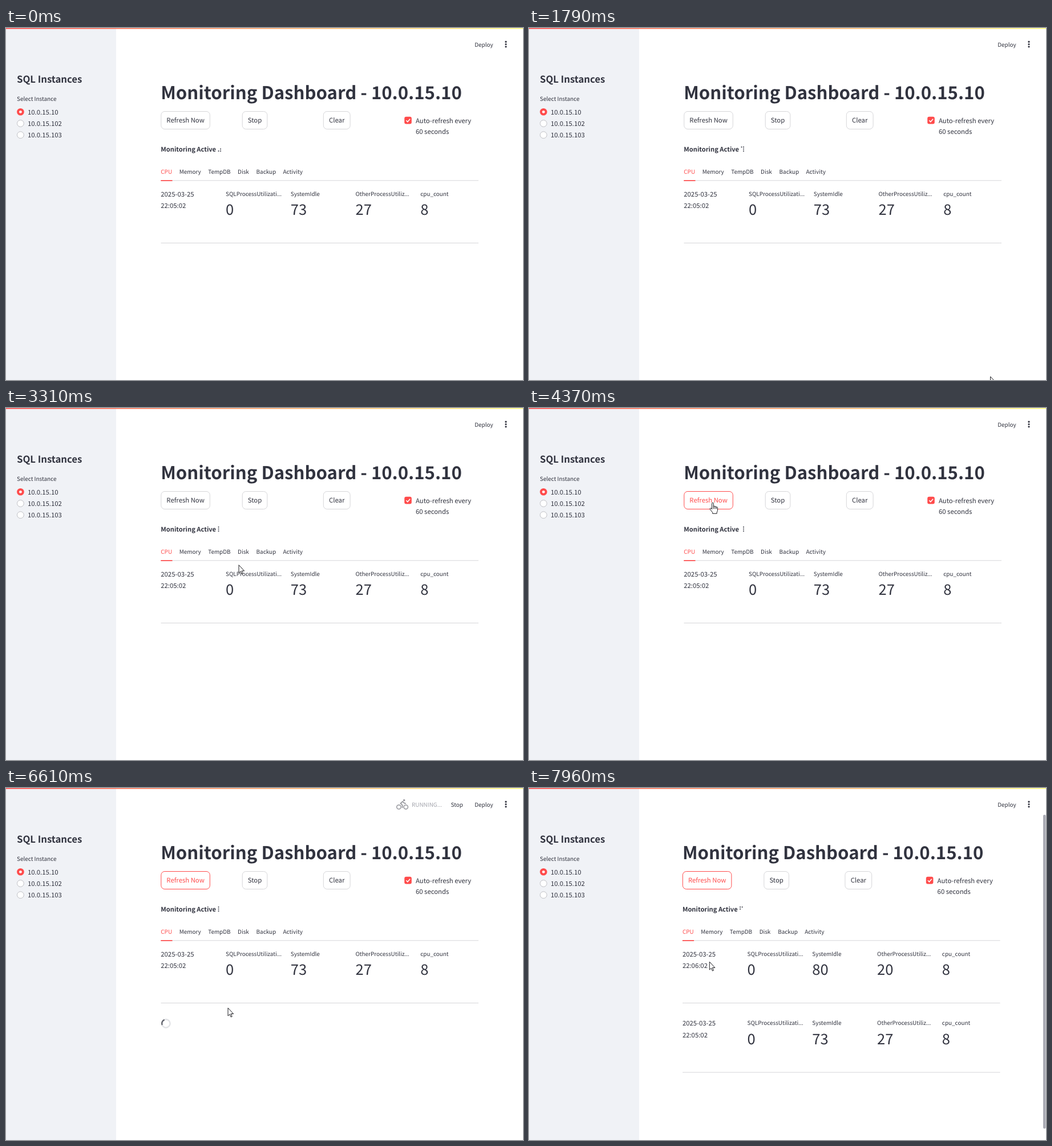
An HTML page that plays this animation: 906x618 px, repeating every 8 s.

```html
<!DOCTYPE html>
<html lang="en">
<head>
<meta charset="utf-8">
<title>Monitoring Dashboard</title>
<style>
  html, body { margin: 0; width: 100%; height: 100%; overflow: hidden; background: #fff; }
  svg { display: block; width: 906px; height: 618px; }
  text {
    font-family: "Noto Sans CJK SC", "Noto Sans CJK JP", "Noto Sans CJK", "Noto Sans", sans-serif;
    font-size: 11.33px; fill: #31333f; text-rendering: geometricPrecision; white-space: pre;
  }
  .small { font-size: 9.92px; }
  .value { font-size: 25.5px; }
  .title { font-size: 31.15px; font-weight: 700; }
  .head { font-size: 16.7px; font-weight: 600; }
  .strong { font-size: 11.15px; font-weight: 600; }
  .mid { text-anchor: middle; }
  .red { fill: #ff4b4b; }
  .mute { fill: #a3a4ac; }
  .line { stroke: #d6d6d9; fill: none; }
  .button { fill: #fff; stroke: #d6d6d9; }
  .hot rect { stroke: #ff4b4b; }
  .hot text { fill: #ff4b4b; }
  .pointer { fill: #fff; stroke: #1c1c20; stroke-linejoin: round; stroke-linecap: round; }
</style>
</head>
<body>
<svg viewBox="0 0 906 618">
  <defs>
    <linearGradient id="bar">
      <stop stop-color="#ff4b4b"/>
      <stop offset="1" stop-color="#fffd80"/>
    </linearGradient>
  </defs>
  <rect width="906" height="618" fill="#fff"/>
  <rect width="193" height="618" fill="#f0f2f6"/>
  <rect width="906" height="1.6" fill="url(#bar)"/>
  <g id="side"></g>
  <g id="top"></g>
  <g id="running">
    <g transform="translate(684 18.4) scale(.88)" fill="none" stroke="#96979d" stroke-width="1.7">
      <circle cx="5" cy="17" r="4.2"/>
      <circle cx="19" cy="17" r="4.2"/>
      <path d="M12 19v-5.8L8.5 9.8 12.5 6l2.5 2.5q1.6 1.5 4.1 1.5" stroke-width="2"/>
      <circle cx="15.5" cy="3.5" r="2" fill="#96979d" stroke="none"/>
    </g>
  </g>
  <g id="page">
    <g id="spinner" fill="none" stroke-width="2.4">
      <circle cx="280.3" cy="413.5" r="7.2" stroke="#e2e3e6"/>
      <path d="M275.2 408.4A7.2 7.2 0 0 1 285.4 408.4" stroke="#62646d"/>
    </g>
  </g>
  <rect id="scroll" x="901" y="47" width="4.6" height="551" rx="2" fill="#a9aab3"/>
  <path id="arrow" class="pointer" d="M0 0V13.6L3.1 10.8 5.2 15.6 7.2 14.7 5.1 10H9.2Z"/>
  <path id="hand" class="pointer" d="M-1.4 11V1.3Q-1.4 0 0 0T1.4 1.3V7Q1.6 5.7 2.8 5.9T4 7.3Q4.3 6.3 5.4 6.6T6.5 8Q6.9 7.2 7.8 7.6T8.5 9V13Q8.5 15 7.2 16.8V19H-.3V17.2L-4.6 11.6Q-5.3 10.3-4.2 9.7T-2.2 10.2ZM1.4 7V10.5M4 7.3V10.5M6.5 8V10.5"/>
</svg>
<script>
const LOOP = 8000;
const $ = id => document.getElementById(id);

function add(parent, tag, attrs, text) {
  const el = document.createElementNS("http://www.w3.org/2000/svg", tag);
  for (const k in attrs) el.setAttribute(k, attrs[k]);
  if (text) el.textContent = text;
  return parent.appendChild(el);
}
const label = (parent, x, y, text, cls = "") => add(parent, "text", { x, y, class: cls }, text);
const rule = (parent, y) => add(parent, "path", { d: `M271.5 ${y}H828`, class: "line" });

function button(x, width, text) {
  const g = add(page, "g", {});
  add(g, "rect", { x, y: 146.5, width, height: 31, rx: 6.3, class: "button" });
  label(g, x + width / 2, 166, text, "mid");
  return g;
}

function record(y, time, idle, other) {
  const g = add(page, "g", { transform: `translate(0 ${y})` });
  label(g, 271.3, 295.8, "2025-03-25");
  label(g, 271.3, 316.3, time);
  const cells = [["SQLProcessUtilizati...", 0], ["SystemIdle", idle], ["OtherProcessUtiliz...", other], ["cpu_count", 8]];
  cells.forEach(([name, value], i) => {
    const x = 385 + i * 113.75;
    label(g, x, 294.8, name, "small");
    label(g, x, 328.4, String(value), "value");
  });
  rule(g, 377.5);
  return g;
}

const side = $("side"), topBar = $("top"), page = $("page"), running = $("running");

label(side, 19, 96.4, "SQL Instances", "head");
label(side, 19, 128.3, "Select Instance", "small");
["10.0.15.10", "10.0.15.102", "10.0.15.103"].forEach((ip, i) => {
  const cy = 147.3 + i * 20.25;
  add(side, "circle", { cx: 25.4, cy, r: i ? 5.9 : 6.3, fill: i ? "#fff" : "#ff4b4b", stroke: i ? "#bfc0c5" : "none" });
  if (!i) add(side, "circle", { cx: 25.4, cy, r: 2.4, fill: "#fff" });
  label(side, 38, cy + 4.4, ip);
});

label(topBar, 821.3, 32.6, "Deploy", "small");
for (const cy of [24.2, 28.5, 32.8]) add(topBar, "circle", { cx: 876, cy, r: 1.6, fill: "#31333f" });
label(running, 711, 32.6, "RUNNING...", "small mute");
label(running, 779.5, 32.6, "Stop", "small");

label(page, 271.3, 124.6, "Monitoring Dashboard - 10.0.15.10", "title");
const refresh = button(271.8, 85.5, "Refresh Now");
button(414.2, 43.6, "Stop");
button(556.3, 46.8, "Clear");
add(page, "rect", { x: 698.2, y: 155.8, width: 12.6, height: 12.6, rx: 3, fill: "#ff4b4b" });
add(page, "path", { d: "M701.3 162.2l2.5 2.5 4.3-5", fill: "none", stroke: "#fff", "stroke-width": 1.6 });
label(page, 718, 166.8, "Auto-refresh every");
label(page, 718, 185.9, "60 seconds");
label(page, 271.3, 217.2, "Monitoring Active", "strong");

const tabs = { CPU: 271.3, Memory: 303.7, TempDB: 354.2, Disk: 406.1, Backup: 438.6, Activity: 485.6 };
rule(page, 267.8);
for (const name in tabs) label(page, tabs[name], 255.5, name, name === "CPU" ? "small red" : "small");
add(page, "rect", { x: 271.3, y: 267, width: 20.2, height: 1.7, fill: "#ff4b4b" });

const oldTop = record(0, "22:05:02", 73, 27);
const newTop = record(0, "22:06:02", 80, 20);
const oldBelow = record(121.7, "22:05:02", 73, 27);

// Six dots, left column first, top to bottom.
const dots = Array.from({ length: 6 }, (_, i) => add(page, "circle", {
  cx: i < 3 ? 372.5 : 376, cy: 209.1 + (i % 3) * 3.45, r: 1, fill: "#31333f"
}));
const poses = ["356", "236", "1236", "123", "1234", "124", "145", "1456", "456", "3456"];
const ticks = [0, 130, 380, 650, 900, 1110, 1380, 1640, 1890, 2130, 2380, 2610, 2850, 3120, 3370,
  3580, 3840, 4100, 4340, 4560, 4770, 5040, 5300, 5625];

const RERUN = 7560;
const visible = [
  [running, 5700, 7760],
  [$("spinner"), 5700, 7320],
  [oldTop, 0, 7320],
  [newTop, 7320, LOOP],
  [oldBelow, RERUN, LOOP],
  [$("scroll"), RERUN, LOOP],
  [$("arrow"), 1050, 4235],
  [$("hand"), 4235, 5720]
];

const linear = p => p;
const smooth = p => p * p * (3 - 2 * p);
const out = p => 1 - (1 - p) ** 2;
// Time, x, y and the easing used to get there.
const path = [
  [1050, 893, 611, linear],
  [1640, 893, 611, linear],
  [1790, 810, 613.5, linear],
  [2380, 408, 276, out],
  [3580, 408, 276, linear],
  [4340, 322, 166.3, smooth],
  [5230, 322, 166.3, linear],
  [5440, 327.5, 177.6, smooth],
  [5640, 327.5, 177.6, linear],
  [6400, 389, 386.5, smooth],
  [7450, 389, 386.5, linear],
  [7940, 316.3, 305.5, smooth]
];

function cursorAt(t) {
  const i = path.findIndex(k => k[0] > t);
  if (i === 0) return path[0].slice(1, 3);
  if (i < 0) return path[path.length - 1].slice(1, 3);
  const [t0, x0, y0] = path[i - 1], [t1, x1, y1, ease] = path[i];
  const p = ease((t - t0) / (t1 - t0));
  return [x0 + (x1 - x0) * p, y0 + (y1 - y0) * p];
}

function draw(t) {
  for (const [el, from, to] of visible) el.style.display = t >= from && t < to ? "" : "none";
  if (t >= 5720) $("arrow").style.display = "";

  const step = ticks.filter(k => k <= t).length - 1;
  const pose = t >= RERUN + 200 ? "124" : poses[step % poses.length];
  dots.forEach((dot, i) => dot.style.display = pose.includes(i + 1) ? "" : "none");

  const [x, y] = cursorAt(t);
  for (const id of ["arrow", "hand"]) $(id).setAttribute("transform", `translate(${x} ${y})`);
  refresh.setAttribute("class", t >= 4235 ? "hot" : "");
  page.setAttribute("transform", `translate(${t >= RERUN ? -2.4 : 0} 0)`);
  $("spinner").setAttribute("transform", `rotate(${t * 0.48 % 360} 280.3 413.5)`);
}

const start = performance.now();
function frame(now) {
  draw(Math.max(0, now - start) % LOOP);
  requestAnimationFrame(frame);
}
draw(0);
requestAnimationFrame(frame);
</script>
</body>
</html>
```
